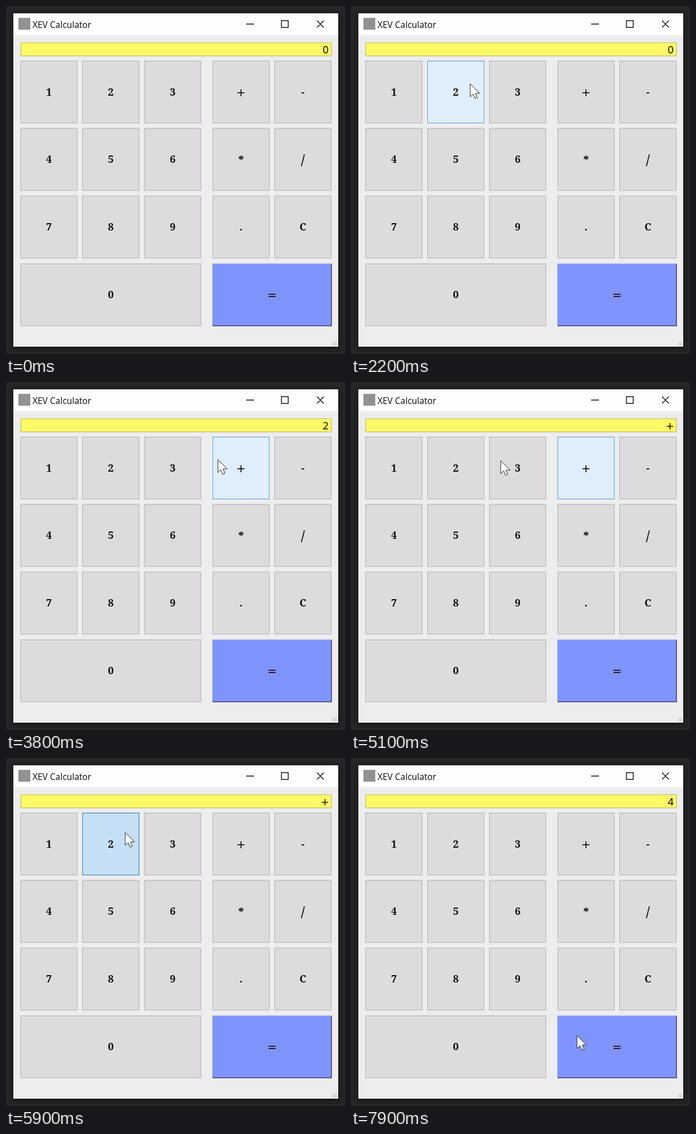
Animation of 600 by 617 pixels, one loop 8 s. Source, as an HTML page:

```html
<!DOCTYPE html>
<html lang="en">
<head>
<meta charset="utf-8">
<title>Calculator</title>
<style>
  html, body { margin: 0; width: 100%; height: 100%; overflow: hidden; background: #232323; }
  svg { display: block; }
  text { fill: #0b0b0b; }
  .key { fill: #dddbdd; stroke: #b0aeb0; }
  .hover { fill: #e0eefb; stroke: #4d9bd3; }
  .press { fill: #c5e0f6; stroke: #2e71b4; }
  .label { font: bold 18px "Noto Serif", serif; text-anchor: middle; }
  .sign { font: 20px "DejaVu Sans", sans-serif; }
  .line { fill: none; stroke: #111; stroke-width: 1.5; }
</style>
</head>
<body>
<svg width="600" height="617" viewBox="0 0 600 617">
  <defs><filter id="blur"><feGaussianBlur stdDeviation="4"/></filter></defs>
  <rect width="600" height="617" fill="#262626"/>
  <rect x="11" y="14" width="579" height="594" fill="#151515" filter="url(#blur)"/>
  <rect x="13" y="13" width="575" height="591" fill="#eeedee"/>
  <rect x="13" y="13" width="575" height="38.5" fill="#fffeff"/>
  <rect x="22" y="21" width="21" height="21" fill="#929292"/>
  <text x="47" y="38.5" font-family="Open Sans, sans-serif" font-size="15.5">XEV Calculator</text>
  <path class="line" d="M425 32H439M487.5 26H499.5V38H487.5ZM550.5 26L562.5 38M562.5 26L550.5 38"/>
  <path d="M579 597h6M579 600.5h6" stroke="#aaa" stroke-width="2" stroke-dasharray="2 2"/>
  <rect x="26" y="65" width="550" height="23.5" fill="#fff966" stroke="#b5b15f"/>
  <text id="display" y="83.5" text-anchor="end"></text>
  <g id="keys"></g>
  <path id="cursor" d="M0 0V23L5.2 18.2 8.7 26 12.5 24.3 9.2 16.7H16.5Z" fill="#fff" stroke="#222" stroke-linejoin="round"/>
</svg>
<script>
const LOOP = 8000, STEP = 100;
const $ = id => document.getElementById(id);
const columns = [26, 135.5, 245, 366, 475.5];
const rows = [97.5, 217, 337, 457];
const HEIGHT = 110;
const rects = {};

function addKey(name, col, row, width = 100) {
  const x = columns[col], y = rows[row], cx = x + width / 2;
  const isSign = name === '+' || name === '=';
  const size = { '/': 24, '*': 20 }[name];
  const drop = { '/': 9, '*': 8, '+': 7, '=': 6.5 }[name] ?? 6;
  $('keys').insertAdjacentHTML('beforeend',
    `<rect class="key" x="${x}" y="${y}" width="${width}" height="${HEIGHT}"/>
     <text class="label ${isSign ? 'sign' : ''}" x="${cx}" y="${y + HEIGHT / 2 + drop}"
       ${size ? `style="font-size:${size}px"` : ''}>${name}</text>`);
  rects[name] = $('keys').lastElementChild.previousElementSibling;
}

['123+-', '456*/', '789.C'].forEach((line, row) =>
  [...line].forEach((name, col) => addKey(name, col, row)));
addKey('0', 0, 3, 319);
addKey('=', 3, 3, 210);
rects['='].style.cssText = 'fill:#8094ff;stroke:none';
rects['='].insertAdjacentHTML('afterend',
  '<path id="light" d="M365.5 567V457H576" fill="none"/>' +
  '<path id="dark" d="M365.5 567H576V457" fill="none" stroke-width="1.5"/>');

// Time, x, y of the pointer tip
const path = [
  [1500, 401, 27], [1600, 290, 95], [1700, 211, 138], [3400, 211, 138],
  [3600, 290, 140], [3800, 375, 137.5], [4100, 402, 140], [4800, 402, 140],
  [5100, 265, 139.5], [5300, 227, 136], [5700, 211, 132], [6200, 211, 132],
  [6700, 277.5, 289.5], [7100, 394, 481], [7400, 400, 492], [LOOP, 400, 492]
];
// Time, active key, its state
const states = [
  [0, '', ''], [1700, '2', 'hover'], [2500, '2', 'press'], [2600, '2', 'hover'],
  [3600, '', ''], [3700, '+', 'hover'], [4300, '+', 'press'], [4500, '+', 'hover'],
  [5200, '', ''], [5300, '2', 'hover'], [5900, '2', 'press'], [6000, '2', 'hover'],
  [6500, '6', 'hover'], [6900, '9', 'hover'], [7000, '', ''],
  [7500, '=', 'press'], [7700, '', '']
];
const readings = [[0, '0'], [2600, '2'], [4500, '+'], [6000, '2'], [7700, '4']];

const latest = (list, t) => list.findLast(item => item[0] <= t);

function pointerAt(t) {
  const i = path.findIndex(p => p[0] > t);
  const [t0, x0, y0] = path[i - 1], [t1, x1, y1] = path[i];
  const k = (t - t0) / (t1 - t0);
  return [x0 + (x1 - x0) * k, y0 + (y1 - y0) * k];
}

function draw(t) {
  const [, key, state] = latest(states, t);
  for (const name in rects)
    rects[name].setAttribute('class', 'key ' + (name === key ? state : ''));
  const sunk = key === '=';
  $('light').setAttribute('stroke', sunk ? '#38406f' : '#a3afed');
  $('dark').setAttribute('stroke', sunk ? '#a3afed' : '#38406f');

  const value = latest(readings, t)[1], plus = value === '+';
  const display = $('display');
  display.textContent = value;
  display.setAttribute('x', plus ? 572 : 571);
  display.style.font = plus ? '18px "DejaVu Sans", sans-serif' : '18.5px "Noto Sans", sans-serif';

  const visible = t >= path[0][0];
  $('cursor').style.display = visible ? '' : 'none';
  if (visible) $('cursor').setAttribute('transform', `translate(${pointerAt(t)})`);
}

const start = performance.now();
function tick() {
  const t = (performance.now() - start) % LOOP;
  draw(Math.floor(t / STEP) * STEP);
  requestAnimationFrame(tick);
}
tick();
</script>
</body>
</html>
```
